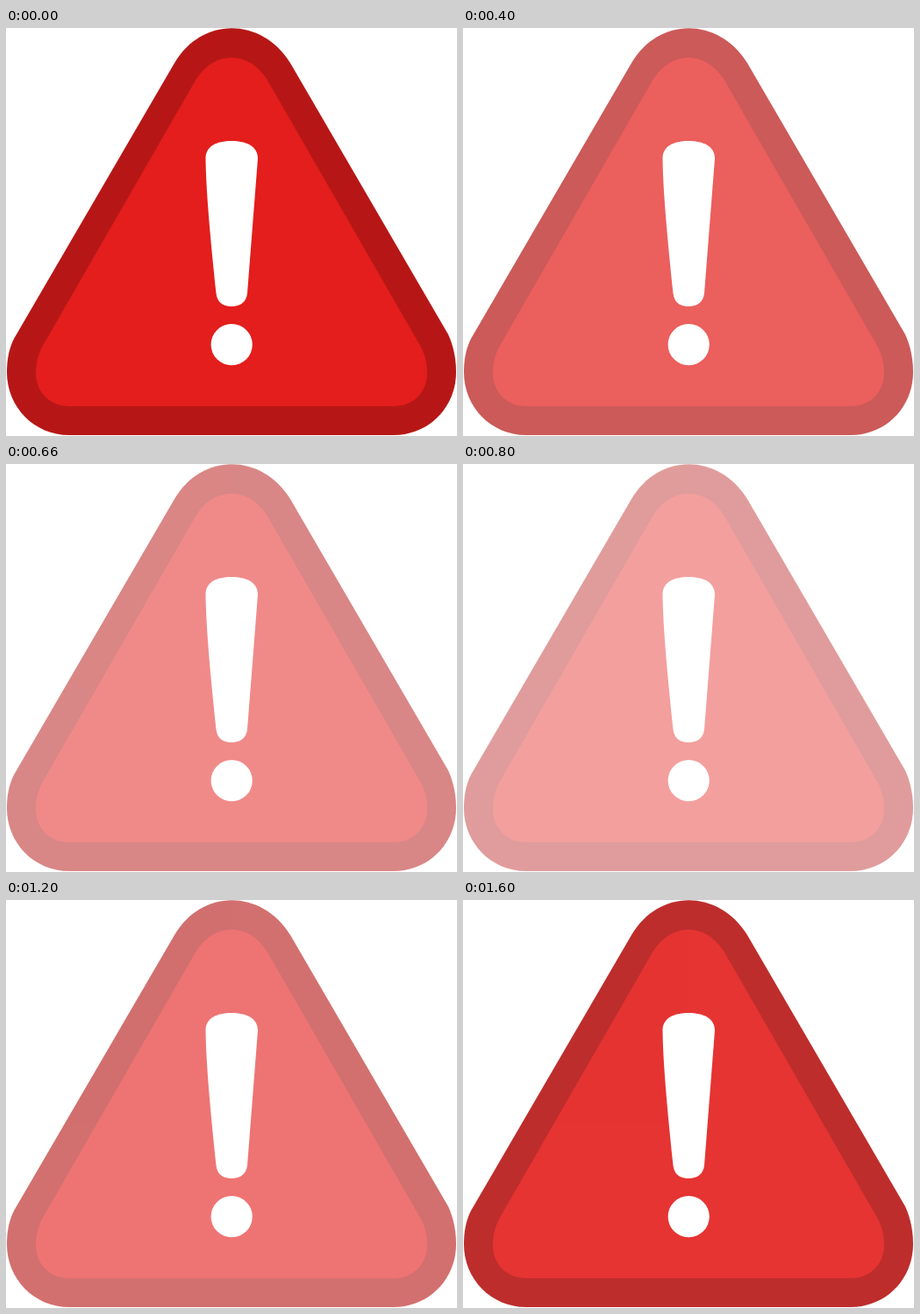
Write an HTML page that moves like this. It is 514 px wide and 466 px high and loops after 1.66 s.

```html
<!DOCTYPE html>
<html lang="en">
<head>
<meta charset="utf-8">
<title>Pulsing warning sign</title>
<style>
  html, body { margin: 0; width: 100%; height: 100%; overflow: hidden; background: #fff; }
  svg { display: block; width: 100%; height: 100%; }
</style>
</head>
<body>
<svg viewBox="0 0 514 466">
  <g id="sign">
    <path fill="#b61716" d="M192 40C223-13 291-13 324 40L504 350C510 363 513 378 513 393C513 433 482 465 442 465H72C32 465 1 433 1 393C1 380 3 367 9 355Z"/>
    <path fill="#e31e1c" d="M217 58C238 25.500 276 25.500 297 58L471 361C477 371 480 382 480 394C480 416 464 432 442 432H72C50 432 34 416 34 394C34 382 37 371 43 361Z"/>
  </g>
  <g fill="#fff">
    <path d="M227.500 149C227.500 135 240 129 257 129S287 135 287 149L275 303C274 313 267 318 257 318S240.500 313 239.500 303C234 250 228 190 227.500 149Z"/>
    <circle cx="257.200" cy="361.600" r="23.600"/>
  </g>
</svg>
<script>
  const duration = 1660;
  const starts = [0, 130, 260, 400, 530, 660, 800, 930, 1060, 1200, 1330, 1460, 1600];

  // Opacity falls evenly, then climbs back through the same levels.
  const level = i => 1 - 0.096 * Math.min(i, starts.length - i);

  const frames = starts.map((start, i) => ({
    offset: start / duration,
    opacity: level(i),
    easing: 'step-end'
  }));
  frames.push({ offset: 1, opacity: 1 });

  document.getElementById('sign').animate(frames, { duration, iterations: Infinity });
</script>
</body>
</html>
```
